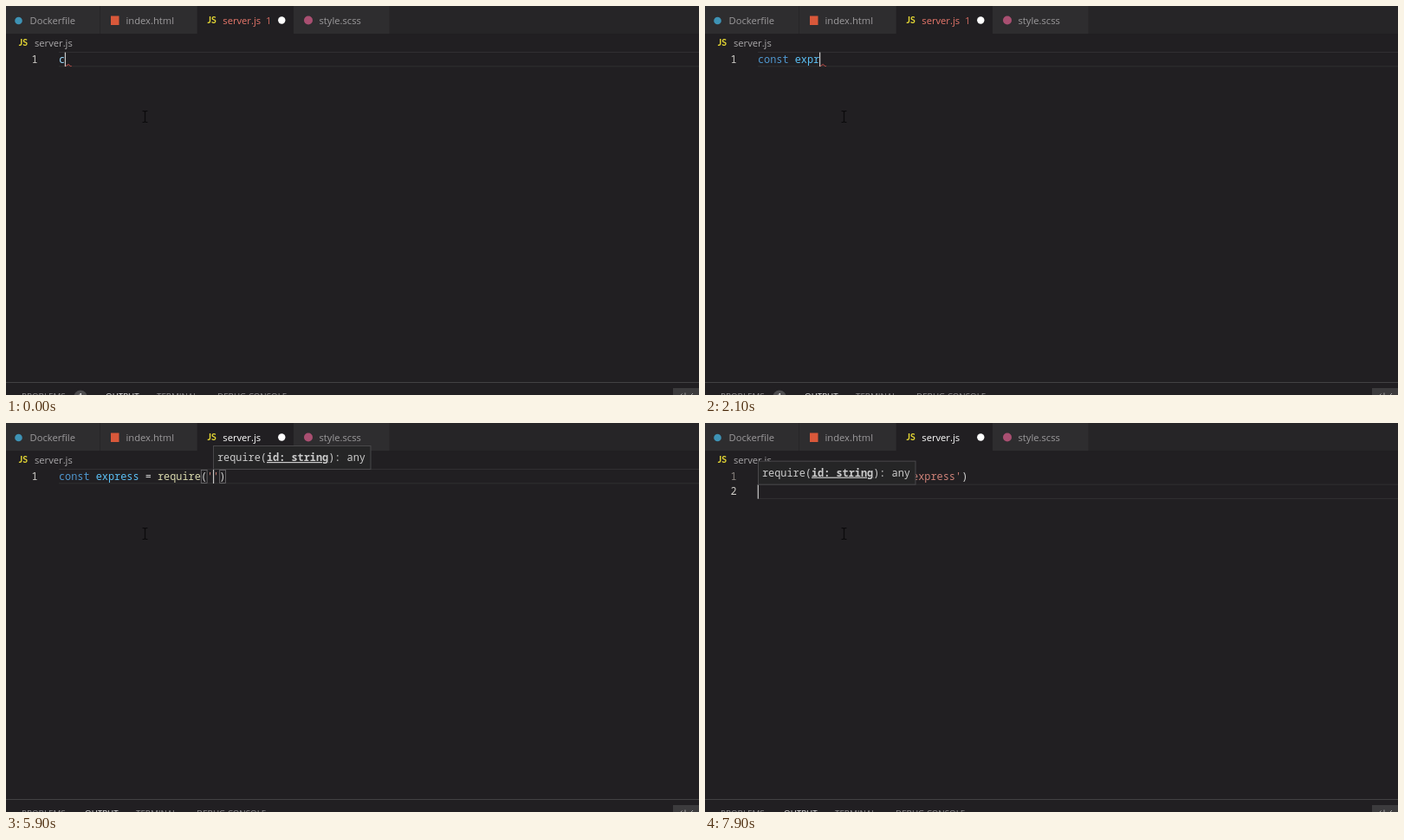
An HTML page for the animation above (8000 ms loop, 800 by 450 pixels).

```html
<!DOCTYPE html>
<html lang="en">
<head>
<meta charset="utf-8">
<title>Typing in an editor</title>
<style>
  html, body { margin: 0; width: 100%; height: 100%; overflow: hidden; background: #211f22; }
  svg { display: block; width: 800px; height: 450px; }
  text { white-space: pre; }
  .ui { font: 11.2px "Open Sans", sans-serif; }
  .panel { font: 9.8px "Open Sans", sans-serif; }
  .code { font: 500 11.883px "Noto Sans Mono", monospace; }
  .js { font: bold 10.5px "Lato", sans-serif; fill: #e6d834; }
</style>
</head>
<body>
<svg viewBox="0 0 800 450">
  <rect width="800" height="450" fill="#211f22"/>
  <rect width="800" height="32" fill="#262527"/>
  <g fill="#2e2d2f">
    <rect width="108" height="32"/>
    <rect x="109" width="111.5" height="32"/>
    <rect x="332" width="110.5" height="32"/>
  </g>
  <rect x="221" width="111" height="33" fill="#211f22"/>
  <circle cx="14.5" cy="17" r="4.3" fill="#3e93b5"/>
  <rect x="121" y="11.5" width="9.5" height="10.5" fill="#d9583a"/>
  <circle cx="349" cy="16.5" r="5" fill="#a94f71"/>
  <g class="ui" fill="#9c9a9c">
    <text x="27.5" y="20.7">Dockerfile</text>
    <text x="138.5" y="20.7">index.html</text>
    <text x="361.5" y="20.7">style.scss</text>
    <text x="33" y="46.8" fill="#aaa8aa">server.js</text>
  </g>
  <text class="js" x="232.5" y="20.3">JS</text>
  <text class="js" x="14.8" y="46.3">JS</text>
  <circle cx="318.3" cy="16.5" r="4.2" fill="#fff"/>
  <path d="M0 435.5H800" stroke="#434244"/>
  <rect x="770" y="442" width="30" height="8" fill="#3c3b3d"/>
  <path d="M779 450l1.5-1.5M784 447.5v2.5M791 450l2-2" stroke="#a5a5a5"/>
  <g id="view"></g>
</svg>
<script>
const LOOP = 8000, X0 = 61, CW = 7.13, ROW = 17.65;
const view = document.getElementById('view');

const cons = ['console', 'const', 'ConstantSourceNode', 'CountQueuingStrategy',
  'msContentScript', 'CompositionEvent', 'CloseEvent', 'HTMLFormControlsCollection',
  'CaretPosition', 'customElements', 'DynamicsCompressorNode', 'CustomElementRegistry'];
const keys = ['export', 'extends'];
const req = ['require', 'NodeRequire', 'NodeRequireFunction'];
const mods = ['express', 'extend', 'extsprintf', 'external-editor'];
const keywords = ['const', ...keys];

const D = 'const express', R = D + ' = require', Q = R + "('", END = "')";
// time, typed text, error shown, suggestions, auto-closed tail, hint x
const steps = [
  [0, 'c', 1], [100, 'c', 0],
  [400, 'co', 0, cons], [600, 'con', 0, cons], [800, 'cons', 1, cons], [1200, 'const', 1, cons],
  [1300, 'const ', 0], [1500, 'const e', 1, keys], [1700, 'const ex', 1, keys],
  [1900, 'const exp', 1, ['export']], [2100, 'const expr', 1],
  [2200, 'const expre', 1], [2500, 'const expres', 1], [2700, D, 1],
  [2900, D + ' ', 0], [3000, D + ' =', 0], [3100, D + ' =', 1], [3200, D + ' = ', 1],
  [3600, D + ' = r', 0], [3800, D + ' = re', 1], [3900, D + ' = req', 1], [4000, D + ' = requ', 1],
  [4500, D + ' = requi', 1], [4600, D + ' = requir', 1], [4700, R, 1],
  [4900, R, 1, req], [5300, R + '(', 0, 0, ')'], [5500, R + '(', 0, 0, ')', 232],
  [5800, Q, 0, 0, END, 239], [6200, Q + 'e', 0, 0, END, 247],
  [6400, Q + 'ex', 0, mods, END, 253], [6600, Q + 'exp', 0, ['express'], END, 256],
  [6800, Q + 'expr', 0, ['express'], END, 263], [7000, Q + 'expre', 0, ['express'], END, 270],
  [7200, Q + 'expres', 0, ['express'], END, 270], [7300, Q + 'expres', 0, ['express'], END, 283],
  [7400, Q + 'express', 0, ['express'], END, 289], [7800, Q + 'express' + END + '\n', 0, 0, '', 61]
];

const rect = (x, y, w, h, fill, more = '') =>
  `<rect x="${x}" y="${y}" width="${w}" height="${h}" fill="${fill}" ${more}/>`;
const span = (s, fill, more = '') => `<tspan fill="${fill}" ${more}>${s}</tspan>`;
const text = (cls, x, y, body, fill = '#d4d4d4') =>
  `<text class="${cls}" x="${x}" y="${y}" fill="${fill}">${body}</text>`;

function paint(line) {
  const isCall = line.includes('require(');
  return line.replace(/'[^']*'?|\w+|[=()]/g, s => {
    if (s[0] === "'") return span(s, '#cf8279');
    if (s === 'const') return span(s, '#4f97cf');
    if (s === 'require' && isCall) return span(s, '#d9d9ad');
    if (/\w/.test(s)) return span(s, s.startsWith('e') ? '#5bc0f5' : '#9cdcfe');
    return s;
  });
}

// Indices of the letters that match; the last two may be swapped.
function match(word, key) {
  const low = word.toLowerCase();
  const start = Math.max(0, low.indexOf(key.slice(0, 2)));
  const find = k => {
    const hits = [];
    let at = start;
    for (const c of k) {
      const i = low.indexOf(c, at);
      if (i < 0) return null;
      hits.push(i);
      at = i + 1;
    }
    return hits;
  };
  return find(key) || find(key.slice(0, -2) + key.slice(-1) + key.slice(-2, -1)) || [];
}

function icon(word, list, x, y) {
  const p = (d, c) => `<path d="${d}" fill="none" stroke="${c}" stroke-width="1.2"/>`;
  if (list.includes('express')) return text('code', x, y + 4, '{}', '#e0e0e0');
  if (keywords.includes(word))
    return p(`M${x + 1} ${y - 4.5}h7m2 0h4m-13 3h12m-12 3h6m2 0h4m-12 3h13`, '#b5b5b5');
  return p(`M${x + 3.5} ${y - 4}h-2.5v8.5h2.5M${x + 11} ${y - 4}h2.5v8.5h-2.5`, '#b4c6d4') +
    `<ellipse cx="${x + 7.2}" cy="${y + .3}" rx="3" ry="2.5" fill="#4f9fd6" stroke="#8ec5ec"/>` +
    p(`M${x + 5.5} ${y + 1.5}l3.4-2.5`, '#26384a');
}

function popup(list, x, key) {
  const long = list.length > 10, w = long ? 389 : 399;
  let out = rect(x + .5, 70.5, 400, ROW * list.length + 2.8, '#252526', 'stroke="#474648"') +
    rect(x + 1, 71.3, w, list.length > 1 ? ROW : 18.7, '#11496f');
  if (long) out += rect(x + 1, 71.3 + ROW * 3, w, ROW, '#2e2d30') + rect(x + 390, 71, 10, 198.5, '#4d4c4e');
  list.forEach((word, i) => {
    const y = 80.5 + i * 17.6, hits = match(word, key);
    const body = [...word].map((c, j) => hits.includes(j) ? span(c, '#2aa3ec', 'font-weight="bold"') : c).join('');
    out += icon(word, list, x + 3, y) + text('code', x + 21.7, y + 4, body, '#dadada');
  });
  return out;
}

function hint(x, top) {
  const bold = '<tspan font-weight="bold" text-decoration="underline">id: string</tspan>';
  return rect(x + .5, top + .5, 181.5, 27, '#252526', 'stroke="#49484a"') +
    text('code', x + 5, top + 18, `require(${bold}): any`, '#cccccc');
}

function panel(err) {
  const x = err ? 115 : 91;
  const badge = err ? '<circle cx="86" cy="452" r="7.6" fill="#4d4c4e"/>' +
    text('panel', 83.5, 455, '1', '#fff') : '';
  return text('panel', 18, 454.7, 'PROBLEMS', '#969496') + badge +
    text('panel', x, 454.7, 'OUTPUT', '#e7e7e7') +
    text('panel', x + 59, 454.7, 'TERMINAL', '#969496') +
    text('panel', x + 129, 454.7, 'DEBUG CONSOLE', '#969496');
}

function pointer(hand) {
  if (!hand) return '<path d="M157.5 121.5h2l1 1 1-1h2M160.5 122.5v11M157.5 134.5h2l1-1 1 1h2" fill="none" stroke="#0b0a0c" stroke-width="1.2"/>';
  return '<path d="M157.5 129q1.8-2 3.4 0v5.5q1.8-.8 2.5.6 1.6-.6 2.2.7 1.8-.4 2.2 1.2v5l-1.6 3.2v2.8h-7.6v-2.4l-4.8-6.6q.8-2.4 3.7.2z" fill="#fff" stroke="#1a1a1a" stroke-width=".8"/>';
}

function draw([, typed, err, list, tail = '', hintX]) {
  const [first, second] = typed.split('\n');
  const row = second === undefined ? 0 : 1;
  const caret = X0 + CW * (row ? 0 : first.length), top = 53 + row * ROW;
  let out = text('ui', 250.3, 20.7, 'server.js', err ? '#e8776b' : '#fff');
  if (err) out += text('ui', 300, 20.7, '1', '#d06a60');
  out += panel(err);
  out += `<path d="M${X0} ${top + .5}H800M${X0} ${top + 16.8}H800" stroke="#302f31"/>`;
  out += text('code', 29.5, 65.7, '1', row ? '#8b8580' : '#cfcdc8');
  if (row) out += text('code', 29.5, 83.4, '2', '#cfcdc8');
  out += text('code', X0, 65.7, paint(first + tail));
  if (tail) {
    const boxes = [first.indexOf('('), (first + tail).length - 1];
    boxes.forEach(i => out += rect(X0 + CW * i + .3, 54.5, CW - .3, 15, 'none', 'stroke="#737274" stroke-width=".8"'));
  }
  if (err) out += `<path d="M${caret} 69.7l1.5-.4 2.4-1.8 2.3 2h1.3" fill="none" stroke="#c9504a"/>`;
  out += rect(caret - .3, top + .6, 1.2, 16.4, '#c8c8c8');
  if (list) out += popup(list, Math.floor(caret), first.match(/\w*$/)[0]);
  if (hintX) out += hint(hintX, 26 + row * ROW);
  view.innerHTML = out + pointer(list === cons);
}

const begin = performance.now();
let shown = null;
function tick() {
  const t = (performance.now() - begin) % LOOP;
  const step = steps.filter(s => s[0] <= t).pop();
  if (step !== shown) draw(shown = step);
  requestAnimationFrame(tick);
}
tick();
</script>
</body>
</html>
```
